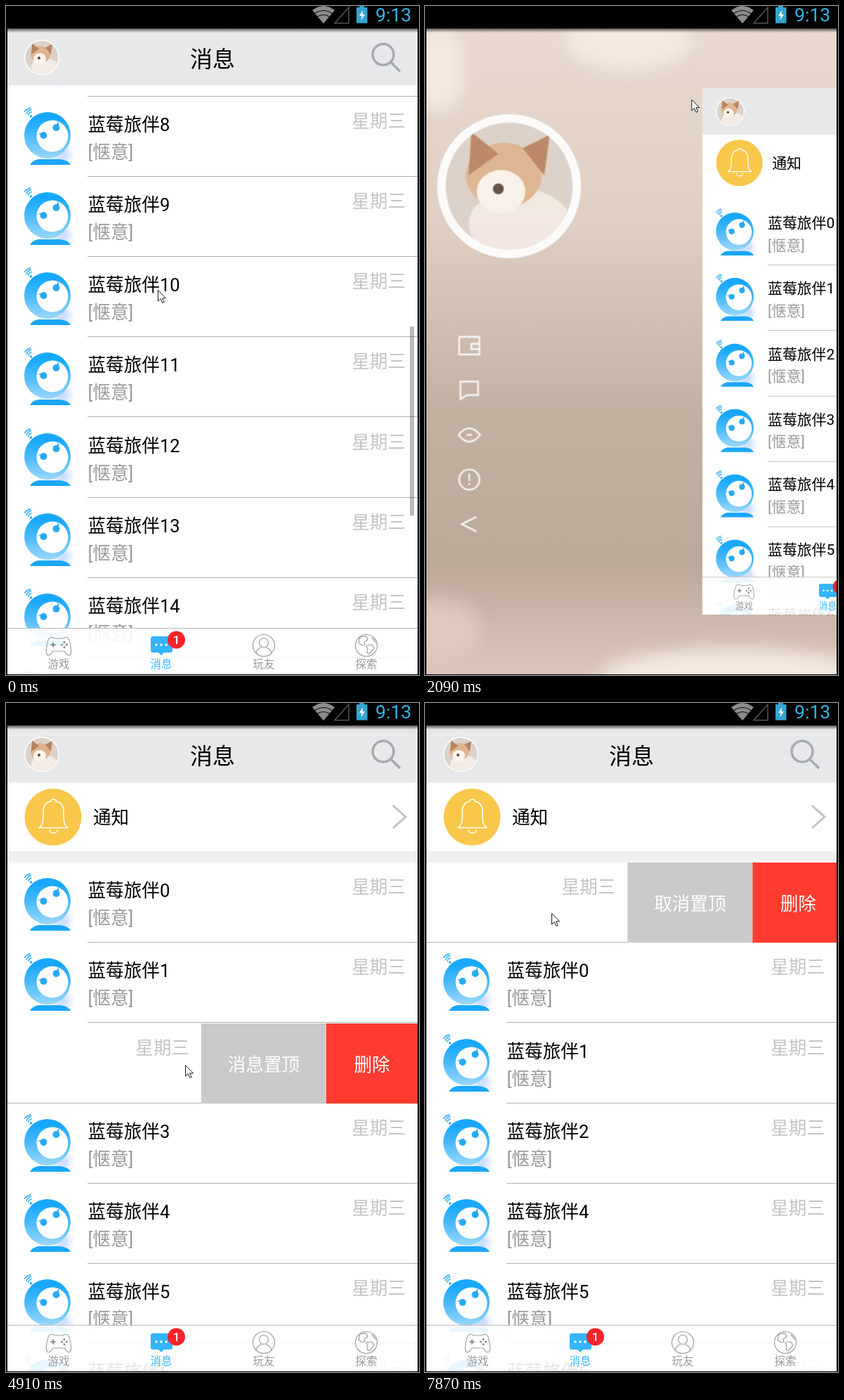
An HTML page for the animation above (8 s loop, 588 by 952 pixels).

```html
<!DOCTYPE html>
<html lang="zh">
<head>
<meta charset="utf-8">
<style>
html, body { margin: 0; width: 100%; height: 100%; overflow: hidden; background: #000; }
svg { display: block; width: 100vw; height: 100vh; }
text { font-family: Roboto, "Noto Sans CJK SC", "Noto Sans CJK", sans-serif; font-size: 25.6px; }
.line { fill: none; stroke: #a0a0a0; stroke-width: 1.2; stroke-linecap: round; stroke-linejoin: round; }
.dots { fill: none; stroke-linecap: round; stroke-width: 3.5; }
.tab text { font-size: 15.5px; text-anchor: middle; fill: #999; }
</style>
</head>
<body>
<svg viewBox="0 0 588 952">
  <defs>
    <linearGradient id="head" x2="0" y2="1">
      <stop offset=".15" stop-color="#18a8ff"/><stop offset=".55" stop-color="#4fbcfb"/><stop offset="1" stop-color="#9bd8fb"/>
    </linearGradient>
    <linearGradient id="wall" x2="0" y2="1">
      <stop stop-color="#e9d9ce"/><stop offset=".3" stop-color="#e0cfc2"/>
      <stop offset=".6" stop-color="#c2b0a1"/><stop offset=".83" stop-color="#bba999"/><stop offset="1" stop-color="#dcc6ba"/>
    </linearGradient>
    <linearGradient id="shade" x2="0" y2="1">
      <stop stop-opacity=".6"/><stop offset="1" stop-opacity="0"/>
    </linearGradient>
    <radialGradient id="halo">
      <stop offset=".3" stop-color="#cfe0ff"/><stop offset="1" stop-color="#e8eeff" stop-opacity="0"/>
    </radialGradient>
    <filter id="soft" x="-50%" y="-50%" width="200%" height="200%"><feGaussianBlur stdDeviation="12"/></filter>
    <clipPath id="screen"><rect x="2" y="32" width="584" height="919"/></clipPath>
    <clipPath id="round"><circle r="23.5"/></clipPath>

    <g id="robot">
      <circle cx="80" cy="84" r="20" fill="url(#halo)"/>
      <circle cx="59" cy="56" r="33" fill="url(#head)"/>
      <path d="M34 98Q37 92 46 90H76Q89 91 92 98Z" fill="#1aa7fd"/>
      <circle cx="66" cy="57" r="22.5" fill="#fff"/>
      <g fill="#2aa9f5">
        <circle cx="53.5" cy="56" r="5"/><circle cx="71.5" cy="45" r="5"/>
        <path d="M45 54l9-2v4zM75 36l-4 6 4 3z"/>
        <circle cx="35.5" cy="29" r="1.8"/>
      </g>
      <path d="M31 27.500a5 5 0 0 1 5.500-4M28.500 25a9 9 0 0 1 8.500-5M26.500 21.500a13 13 0 0 1 10-4"
        transform="rotate(-12 33 23)" fill="none" stroke="#38b0f8" stroke-width="1.7"/>
    </g>

    <g id="photo">
      <circle r="25" fill="#fff"/>
      <g clip-path="url(#round)">
        <circle r="25" fill="#dcd2ca"/>
        <ellipse cx="4" cy="14" rx="19" ry="13" fill="#f3ebe4"/>
        <ellipse cx="-2" cy="-4" rx="14" ry="12" fill="#deb48f"/>
        <path d="M-15-4L-14-20-4-12ZM5-14L15-19 13-4Z" fill="#b98460"/>
        <ellipse cx="-3" cy="2" rx="9" ry="8" fill="#fbf4ed"/>
        <circle cx="-4" cy="1" r="2" fill="#5b463c"/>
      </g>
    </g>
  </defs>

  <g clip-path="url(#screen)">
    <rect x="2" y="32" width="584" height="919" fill="url(#wall)"/>
    <g filter="url(#soft)" fill="#f4eae2">
      <ellipse cx="20" cy="90" rx="35" ry="60"/>
      <ellipse cx="290" cy="50" rx="90" ry="40"/>
      <ellipse cx="440" cy="955" rx="190" ry="40"/>
      <ellipse cx="20" cy="890" rx="60" ry="45" fill="#e0c8bd"/>
    </g>
    <g id="menu">
      <circle cx="122" cy="247" r="103" fill="#d9c8bb" stroke="#fff" stroke-width="7"/>
      <use href="#photo" transform="translate(122 247) scale(4)"/>
      <g id="icons" fill="none" stroke="#fff" stroke-width="2.5"></g>
    </g>

    <g id="panel"><g clip-path="url(#screen)">
      <rect x="2" y="32" width="584" height="919" fill="#fff"/>
      <g id="notice">
        <circle cx="67" cy="162.3" r="40.5" fill="#f9c74a"/>
        <path d="M47 177.500h41q-6-4-6-14v-8q0-14-11-15.500a3.500 3 0 0 0-7 0q-11 1.500-11 15.500v8q0 10-6 14zM62 181a5.500 4 0 0 0 11 0" class="line" style="stroke:#fff;stroke-width:1.6"/>
        <text x="124" y="172">通知</text>
        <path d="M551 146l18 16-18 16" fill="none" stroke="#c2c2c2" stroke-width="3"/>
        <rect id="band" x="2" y="211" width="584" height="15.5" fill="#f0f0f0"/>
      </g>
      <g id="rows"></g>
      <rect id="bar" x="575" width="6" height="269" opacity=".27"/>

      <rect x="2" y="32" width="584" height="81" fill="#e8e8ea"/>
      <use href="#photo" x="51" y="73"/>
      <text x="294" y="87" text-anchor="middle" style="font-size:32px">消息</text>
      <path d="M548 80l13 13M552 69a15 15 0 1 0-30 0a15 15 0 1 0 30 0" fill="none" stroke="#a4acaf" stroke-width="3.5"/>

      <rect x="2" y="885" width="584" height="66" fill="#fff" opacity=".9"/>
      <rect x="2" y="885" width="584" height="1" fill="#b8b8b8"/>
      <g class="tab">
        <path class="line" d="M64 898.500q3-.5 5 1.500h12q2-2 5-1.500q4 .5 5.500 10q3 15-2 15.500q-3 0-6-6h-17q-3 6-6 6q-5-.5-2-15.500q1.500-9.500 5.500-10z"/>
        <path d="M63.500 909h7M67 905.500v7" stroke="#888" stroke-width="1.8"/>
        <path class="dots" d="M79.500 909h0M86.500 909h0M83 905.500h0M83 912.500h0" stroke="#888" style="stroke-width:3"/>
        <rect x="206" y="897" width="31" height="23" rx="3" fill="#33b5ff"/>
        <path d="M216 919h10l-5 5z" fill="#33b5ff"/>
        <path class="dots" d="M214 909h0M221 909h0M228 909h0" stroke="#fff"/>
        <circle cx="242.5" cy="902" r="12.5" fill="#fa2328"/>
        <text x="242.5" y="908" style="fill:#fff;font-size:17px;font-weight:500">1</text>
        <g class="line">
          <circle cx="367" cy="910" r="15.5"/><circle cx="367" cy="906" r="6.5"/><path d="M356 921q1-6 8-8.500M378 921q-1-6-8-8.500"/>
          <circle cx="513" cy="910" r="15.5"/><path d="M504 898l9-1 2 5-5 3 1 4-4 1-5-4zM513 910l8-1 3 5-7 8-3-2 1-4zM521 899l5 6"/>
        </g>
        <g id="labels"></g>
      </g>
    </g></g>
    <rect x="2" y="32" width="584" height="6" fill="url(#shade)"/>
  </g>

  <path d="M452 25L436 6q16-12 32 0z" fill="#8c8c8c"/>
  <path d="M439 11q13-9 26 0M443 15.500q9-6 18 0" fill="none" stroke="#111" stroke-width="1.2"/>
  <path d="M488 2v22.500h-20z" fill="none" stroke="#555" stroke-width="1.5"/>
  <path d="M499 2h4v-2h7v2h4.500v22.500H499z" fill="#33a5cf"/>
  <path d="M508 6l-5 8h3.500l-1 6 5.500-8h-3.500z" fill="#fff"/>
  <text x="526" y="22" fill="#33b5e5" style="font-size:26.6px">9:13</text>
  <path id="cursor" d="M.5.5V16L4.200 12.600 6.800 18.500 9.200 17.400 6.700 11.800H11.500Z" fill="#fff" stroke="#1c1c2c"/>
</svg>
<script>
const $ = id => document.getElementById(id);
const LOOP = 8000, PITCH = 114.2, PINNED_ROW = 3, PIN_TIME = 6765;

// Each swipe uncovers a row's buttons, then lets it slide back.
const swipes = [
  { row: 0, open: 3200, close: 3980 },
  { row: 2, open: 4410, close: 5466 },
  { row: 3, open: 5973, close: 6475 },
  { row: 3, open: 7425, close: LOOP }
];
// Where the pointer turns: time, x, y
const turns = [[0, 216, 404], [500, 200, 640], [1440, 114, 87], [2480, 502, 154], [2760, 502, 154],
  [3200, 480, 285], [3700, 250, 290], [4140, 336, 417], [4410, 430, 512], [4910, 255, 515],
  [5640, 253, 622], [6210, 239, 675], [6800, 375, 634], [7180, 375, 634], [7425, 470, 290], [7870, 180, 299]];

function ramp(t, from, to) {
  const u = Math.min(1, Math.max(0, (t - from) / (to - from)));
  return u * u * (3 - 2 * u);
}

function pointer(t) {
  let [, x, y] = turns[0];
  for (let i = 1; i < turns.length; i++) {
    const [end, nx, ny] = turns[i], u = ramp(t, turns[i - 1][0], end);
    x += (nx - x) * u;
    y += (ny - y) * u;
    if (t < end) break;
  }
  return [x, y];
}

const swipeShift = (row, t) => swipes.filter(s => s.row === row).reduce((sum, s) =>
  sum - 308 * (ramp(t, s.open, s.open + 500) - ramp(t, s.close, s.close + 290)), 0);

const button = (x, width, color, label) => `<rect x="${x}" y="1" width="${width}" height="114" fill="${color}"/>
  <text x="${x + width / 2}" y="68.5" fill="#fff" text-anchor="middle">${label}</text>`;

$('rows').innerHTML = Array.from({ length: 20 }, (_, i) => `<g>
  <use href="#robot"/>
  <text x="116.5" y="50">蓝莓旅伴${i}</text>
  <text x="116.5" y="89" fill="#999">[惬意]</text>
  <text x="569" y="45" fill="#c4c4c4" text-anchor="end">星期三</text>
  <rect x="116" y="114" width="470" height="1" fill="#b0b0b0"/>
  ${button(586, 178, '#cacaca', '消息置顶')}${button(764, 130, '#ff3b30', '删除')}
</g>`).join('');
const rows = [...$('rows').children];
const pinLabel = rows[PINNED_ROW].querySelectorAll('text')[3];

$('labels').innerHTML = ['游戏', '消息', '玩友', '探索'].map((name, i) =>
  `<text x="${75 + 146 * i}" y="941.5"${i === 1 ? ' style="fill:#33b5ff"' : ''}>${name}</text>`).join('');

$('icons').innerHTML = ['M-15-13h30v26h-30zM3-3h12v8h-12z', 'M-13 13v-26h26v20h-16z',
  'M-16 0q16-20 32 0q-16 20-32 0M-4 0h8', 'M-15 0a15 15 0 1 1 30 0a15 15 0 1 1-30 0M0-9V2M0 5v3',
  'M11-11L-11 0 11 11'].map((d, i) => `<path d="${d}" transform="translate(63 ${483 + 66 * i})"/>`).join('');

const place = (id, value) => $(id).setAttribute('transform', value);

function draw(t) {
  const scroll = 1012 * (1 - ramp(t, 0, 1050));
  const open = ramp(t, 1500, 2210) - ramp(t, 2620, 2817);
  const pinned = t >= PIN_TIME;

  rows.forEach((row, i) => {
    const slot = !pinned || i > PINNED_ROW ? i : (i + 1) % (PINNED_ROW + 1);
    const y = Math.floor(226.6 + PITCH * slot - scroll);
    row.setAttribute('transform', `translate(${swipeShift(i, t)} ${y})`);
  });
  pinLabel.textContent = pinned ? '取消置顶' : '消息置顶';

  place('notice', `translate(0 ${-scroll})`);
  $('bar').setAttribute('y', 119 + scroll / 3);
  $('bar').style.display = t < 1590 ? '' : 'none';
  $('band').style.display = open > 0 ? 'none' : '';

  place('panel', `translate(${2 + 425 * open} 492) scale(${1 - .2 * open}) translate(-2 -492)`);
  place('menu', `translate(${32 * (1 - open)} 492) scale(${.5 + .5 * open}) translate(0 -492)`);
  $('menu').setAttribute('opacity', open);
  place('cursor', `translate(${pointer(t)})`);
}

let start;
function tick(now) {
  start ??= now;
  draw((now - start) % LOOP);
  requestAnimationFrame(tick);
}
draw(0);
requestAnimationFrame(tick);
</script>
</body>
</html>
```
